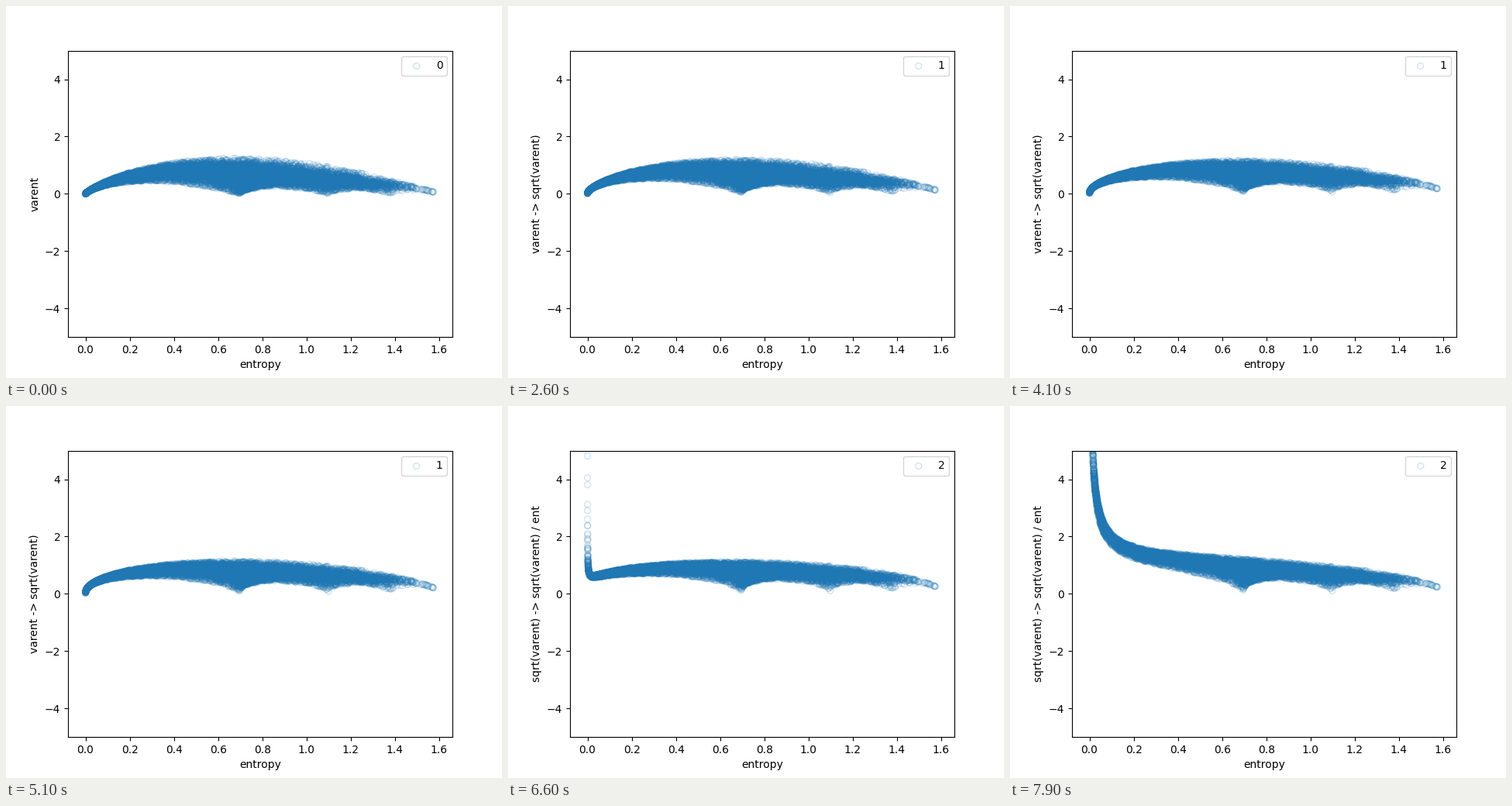
These frames come from a looping animation (640 px wide and 480 px high, 8 s). A matplotlib script:

```python
import numpy as np
import matplotlib.pyplot as plt
from matplotlib.animation import FuncAnimation

HOLD, SPAN, FRAMES = 5, 60, 80
MAX_ENT = 1.581
LABELS = [
    "varent",
    "varent -> sqrt(varent)",
    "sqrt(varent) -> sqrt(varent) / ent",
]


def softmax_stats(count, classes=5, scale=3.2):
    """Entropy and varentropy of softmax over random logits."""
    rng = np.random.default_rng(4)
    logits = rng.normal(0, scale, (count, classes))
    logits -= logits.max(axis=1, keepdims=True)
    logp = logits - np.log(np.exp(logits).sum(axis=1, keepdims=True))
    p = np.exp(logp)
    ent = -(p * logp).sum(axis=1)
    var = (p * (logp + ent[:, None]) ** 2).sum(axis=1)
    inside = ent <= MAX_ENT
    return ent[inside], var[inside]


ent, var = softmax_stats(11000)
root = np.sqrt(var)
levels = [var, root, root / ent]

fig, ax = plt.subplots(figsize=(6.4, 4.8), dpi=100)
dots = ax.scatter(ent, var, s=32, facecolors="none", edgecolors="C0",
                  linewidths=1, alpha=0.2, label="0")
ax.set_xlim(-0.05 * MAX_ENT, 1.05 * MAX_ENT)
ax.set_ylim(-5, 5)
ax.set_xlabel("entropy")
ax.set_ylabel(LABELS[0])
counter = ax.legend(loc="upper right").get_texts()[0]


def update(frame):
    if frame < HOLD:
        stage, y = 0, levels[0]
    else:
        step, k = divmod(frame - HOLD, SPAN)
        t = k / SPAN
        stage = step + 1
        y = (1 - t) * levels[step] + t * levels[stage]
    dots.set_offsets(np.column_stack([ent, y]))
    ax.set_ylabel(LABELS[stage])
    counter.set_text(str(stage))
    return dots, counter


anim = FuncAnimation(fig, update, frames=FRAMES, interval=100,
                     repeat=True, repeat_delay=0, blit=False)
plt.show()
```
